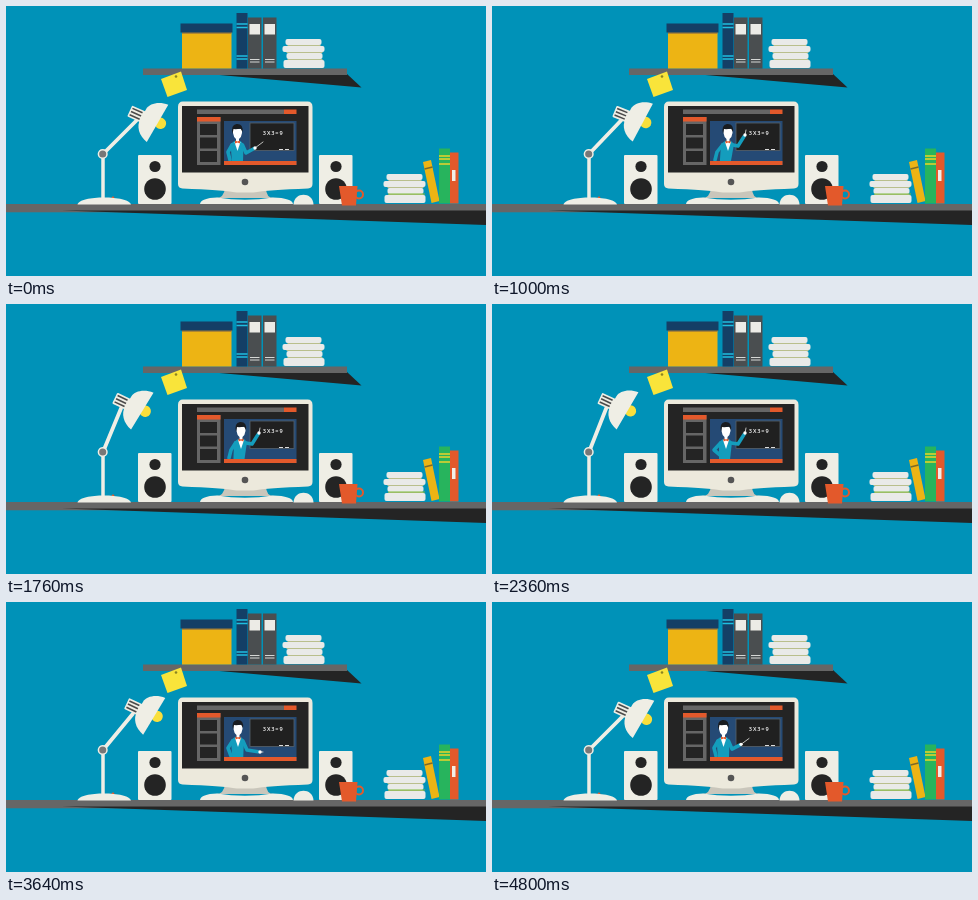
Write an HTML page that moves like this. It is 480 by 270 pixels and loops after 4.84 s.

```html
<!DOCTYPE html>
<html lang="en">
<head>
<meta charset="utf-8">
<title>Desk lesson</title>
<style>
  html, body { margin: 0; width: 100%; height: 100%; overflow: hidden; background: #0092b8; }
  svg { display: block; width: 100vw; height: 100vh; }
  .cream { fill: #efeee5; }
  .dark { fill: #242424; }
  .grey { fill: #666; }
  .orange { fill: #e3592b; }
  .yellow { fill: #edb414; }
  .navy { fill: #143f66; }
  .line { fill: none; stroke-linecap: round; stroke-linejoin: round; }
  text { font: 600 5.6px "Open Sans", sans-serif; letter-spacing: .9px; fill: #fff; }
</style>
</head>
<body>
<svg viewBox="0 0 480 270">
  <defs>
    <g id="speaker">
      <rect class="cream" width="33.5" height="49" rx="1"/>
      <circle class="dark" cx="17" cy="11.5" r="5.6"/>
      <circle class="dark" cx="17" cy="34" r="10.8"/>
    </g>
    <g id="papers" fill="#e9eae8">
      <rect x="3" width="36" height="6" rx="2"/>
      <rect x="0" y="7" width="42" height="6" rx="2"/>
      <rect x="4" y="14" width="36" height="6" rx="2"/>
      <rect x="1" y="21" width="41" height="8" rx="2"/>
      <path d="M5 6.5H38M4 13.5H40M5 20.5H40" stroke="#b9bf8c"/>
    </g>
    <g id="binder">
      <rect width="13.5" height="51" fill="#4a4e50"/>
      <rect x="1.5" y="6.5" width="10.5" height="10.5" fill="#ecebe6"/>
      <path d="M2 42H11.5M2 44.5H11.500" stroke="#d5d7d5"/>
    </g>
  </defs>

  <!-- shelf -->
  <path class="dark" d="M202 68H341L355.500 81.500Z"/>
  <rect class="grey" x="137" y="62.500" width="204" height="6.500"/>
  <rect class="yellow" x="176" y="26" width="49.500" height="36.500"/>
  <rect x="176" y="26" width="49.500" height="1.800" fill="#a07c38"/>
  <rect class="navy" x="174.500" y="17.500" width="52" height="9"/>
  <rect class="navy" x="230.500" y="7" width="11" height="55.500"/>
  <path d="M230.500 18H241.500M230.500 21.500H241.500M230.500 50H241.500M230.500 53H241.500" stroke="#1fbfe0" stroke-width="1.600"/>
  <use href="#binder" x="242" y="11.500"/>
  <use href="#binder" x="257" y="11.500"/>
  <use href="#papers" x="276.500" y="33"/>
  <path d="M155 73L175 65.500L181 84L161.500 91Z" fill="#f9e43a"/>
  <circle cx="170" cy="70.500" r="1.300" fill="#8b8420"/>

  <!-- desk -->
  <rect class="grey" y="198" width="480" height="8.300"/>
  <path class="dark" d="M56 204.500H480V219Z"/>
  <use href="#speaker" x="132" y="149"/>
  <use href="#speaker" x="313" y="149"/>
  <circle class="line" cx="353" cy="188.500" r="4" stroke="#e3592b" stroke-width="2"/>
  <path class="orange" d="M333 180H351.500L350 199.500H336Z"/>
  <path class="cream" d="M287.500 198.500C288 185.500 307 185.500 307.500 198.500Z"/>
  <use href="#papers" x="377.500" y="168"/>
  <path d="M382 188H419" stroke="#7dbb3c"/>
  <path class="yellow" d="M417 156L425 154L433.500 195L425.500 197Z"/>
  <path d="M418.500 163L426.500 161" stroke="#7b6a2a" stroke-width="1.500"/>
  <rect x="433" y="142.500" width="11" height="55" fill="#27b45d"/>
  <path d="M433 150H444M433 153H444M433 158H444" stroke="#edd22a" stroke-width="1.500"/>
  <rect class="orange" x="444" y="146.500" width="8.500" height="51"/>
  <rect x="446" y="164" width="3.500" height="11" fill="#f2efe8"/>

  <!-- computer -->
  <path d="M219 182H260Q260 192 268 192H210Q218 192 219 182Z" fill="#c9c6bb"/>
  <path class="cream" d="M194 198Q195 192 211 191.500Q239 196 267 191.500Q286 192 287 198Z"/>
  <path d="M177 95.500H301.500Q306.500 95.500 306.500 101V178Q306.500 182 302 182.500Q262 184 247 186.500H231Q216 184 176.500 182.500Q172 182 172 178V101Q172 95.500 177 95.500Z" fill="#ece9dc"/>
  <rect class="dark" x="176" y="100" width="126.500" height="66.500"/>
  <circle cx="239" cy="176" r="3.300" fill="#555"/>
  <rect class="grey" x="191" y="103.500" width="87" height="4.500"/>
  <rect class="orange" x="278" y="103.500" width="12.500" height="4.500"/>
  <rect class="grey" x="191" y="111" width="23.500" height="48"/>
  <rect class="orange" x="191" y="111" width="23.500" height="4.500"/>
  <path class="dark" d="M194 118h17v11h-17zm0 13.500h17v11h-17zm0 13.500h17v11h-17z"/>
  <rect x="218" y="115" width="72.500" height="44" fill="#254a75"/>
  <rect x="244" y="117" width="44" height="27.500" fill="#202020" stroke="#56616b" stroke-width=".8"/>
  <text x="256.800" y="129.300">3X3=9</text>
  <path d="M273 143.500H277M279 143.500H283" stroke="#ddd" stroke-width="1.200"/>

  <!-- teacher -->
  <path id="torso" fill="#149dbd"/>
  <path id="backArm" class="line" stroke="#149dbd" stroke-width="3.600"/>
  <g id="head">
    <path d="M-3 9L0 18L3 9Z" fill="#fff"/>
    <path d="M-4.500 -4H4.500V0Q4 4 1.500 6V10H-1.500V6Q-4 4 -4.500 0Z" fill="#fff"/>
    <path d="M-5 1Q-7 -8 -1 -9Q6 -9.500 5 -1L3 -4.500Q-1 -3.500 -4 -4Z" fill="#191c20"/>
    <path class="orange" d="M-2.500 7.500L0 8.500L2.500 7.500V10.500L0 9.500L-2.500 10.500Z"/>
  </g>
  <path id="pointer" class="line" stroke="#e9e9e5" stroke-width=".8"/>
  <path id="frontArm" class="line" stroke="#149dbd" stroke-width="3.600"/>
  <circle id="hand" r="1.700" fill="#fff"/>
  <rect class="orange" x="218" y="155" width="72.500" height="4"/>

  <!-- lamp -->
  <circle class="orange" cx="107" cy="191.800" r="1.300"/>
  <path class="cream" d="M71.500 198.500C73 189 123 189 125 198.500Z"/>
  <path class="line" d="M97 148V193" stroke="#efeee5" stroke-width="3.500"/>
  <path id="lampArm" class="line" stroke="#efeee5" stroke-width="3.800"/>
  <circle cx="96.700" cy="148" r="4.300" fill="#777" stroke="#efeee5" stroke-width="1.500"/>
  <g id="lampHead">
    <circle cx="2.500" cy="-1.500" r="5.700" fill="#f9df3c"/>
    <g transform="rotate(-6)">
      <rect class="cream" x="-30.500" y="-6" width="17" height="12" rx="1"/>
      <path d="M-29 -3.500H-18M-29 0H-18M-29 3.500H-18" stroke="#4b4b4b" stroke-width="1.600"/>
    </g>
    <path class="cream" d="M0 -21.500C-10 -20 -17 -13 -17 -7V5C-17 13 -10 20 0 21.500Z"/>
  </g>
</svg>
<script>
const LOOP = 4840;

// time, arm elevation, shade tilt (degrees)
const lampKeys = [
  [0, 45, 30], [1000, 46.3, 28], [1760, 67.5, 31.5], [2360, 68.5, 30.5],
  [2960, 58, 32], [3640, 50.5, 31], [LOOP, 45, 30]
];

// time, head x, front elbow, front hand, pointer tip, back elbow, back hand
const teacherKeys = [
  [0, 231.5, 240, 147, 249, 142, 257, 136, 222, 146, 224, 154],
  [1000, 236, 246, 140, 253, 129, 254, 124, 225, 146, 223, 154],
  [1760, 235, 246, 140, 253, 129, 254, 124, 225, 146, 223, 154],
  [2360, 234, 246, 140, 253, 129, 254, 124, 222, 146, 228, 151],
  [2960, 233, 246, 140, 253, 129, 254, 124, 222, 146, 228, 151],
  [3640, 232, 241, 148, 254, 150, 257, 150, 222, 146, 225, 154],
  [LOOP, 231.5, 240, 147, 249, 142, 257, 136, 222, 146, 224, 154]
];

// Monotone cubic interpolation, so poses never overshoot.
function sample(keys, t) {
  const i = Math.max(0, keys.findIndex(k => k[0] > t) - 1);
  const last = keys.length - 1;
  const span = keys[i + 1][0] - keys[i][0];
  const u = (t - keys[i][0]) / span;
  return keys[i].slice(1).map((from, n) => {
    const c = n + 1, to = keys[i + 1][c];
    const slope = j => (keys[j + 1][c] - keys[j][c]) / (keys[j + 1][0] - keys[j][0]);
    const tangent = j => {
      const a = slope((j + last - 1) % last), b = slope(j % last);
      return a * b > 0 ? 2 * a * b / (a + b) : 0;
    };
    const ease = u * u * (3 - 2 * u);
    return from + (to - from) * ease
      + span * u * (1 - u) * ((1 - u) * tangent(i) - u * tangent(i + 1));
  });
}

const set = (id, name, value) => document.getElementById(id).setAttribute(name, value);

function drawLamp(t) {
  const [angle, tilt] = sample(lampKeys, t);
  const a = angle * Math.PI / 180;
  const x = 97 + 47 * Math.cos(a), y = 148 - 47 * Math.sin(a);
  set('lampArm', 'd', `M97 148L${x} ${y}`);
  set('lampHead', 'transform', `translate(${x + 21.3} ${y + 2.6}) rotate(${tilt})`);
}

function drawTeacher(t) {
  const [x, ex, ey, hx, hy, px, py, bx, by, cx, cy] = sample(teacherKeys, t);
  const waist = 231 + (x - 231.5) * 0.4;
  set('torso', 'd', `M${x - 3} 135L${x - 7} 138L${waist - 5} 156H${waist + 6}L${x + 6} 138L${x + 3} 135Z`);
  set('head', 'transform', `translate(${x} 127)`);
  set('backArm', 'd', `M${x - 5.5} 139L${bx} ${by}L${cx} ${cy}`);
  set('frontArm', 'd', `M${x + 5} 139L${ex} ${ey}L${hx - (hx - ex) * 0.15} ${hy - (hy - ey) * 0.15}`);
  set('pointer', 'd', `M${hx} ${hy}L${px} ${py}`);
  set('hand', 'cx', hx);
  set('hand', 'cy', hy);
}

function frame(now) {
  const t = now % LOOP;
  drawLamp(t);
  drawTeacher(t);
  requestAnimationFrame(frame);
}
frame(performance.now());
</script>
</body>
</html>
```
